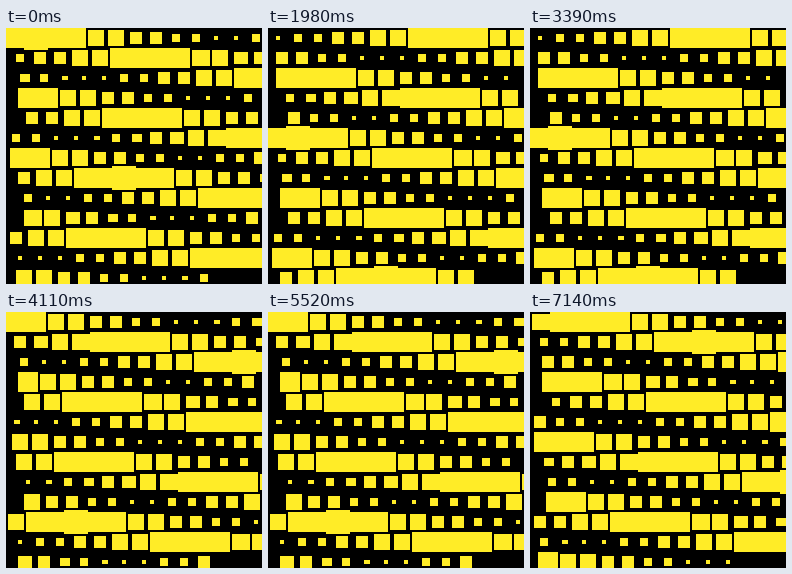
Recreate the animation shown at these times as an HTML page with a canvas. Size 256 by 256 pixels, loop 7.17 s.

```html
<!DOCTYPE html>
<html lang="en">
<head>
<meta charset="utf-8">
<title>Pulsing squares</title>
<style>
  html, body { margin: 0; width: 100%; height: 100%; overflow: hidden; background: #000; }
  canvas { display: block; width: 100vw; height: 100vh; image-rendering: pixelated; }
</style>
</head>
<body>
<canvas id="stage" width="256" height="256"></canvas>
<script>
const ctx = document.getElementById("stage").getContext("2d");
const SIDE = 256, CELL = 20, COUNT = 164;
const TICK = 30, TICKS = 239;
const WAVE = 94; // phase units in one triangle wave

// Distance from the nearest wave crest, 0 to WAVE / 2.
function crestDistance(i, tick) {
  const phase = (((5 * (i - 1) - 2 * tick) % WAVE) + WAVE) % WAVE;
  return Math.min(phase, WAVE - phase);
}

function draw(tick) {
  ctx.fillStyle = "#000";
  ctx.fillRect(0, 0, SIDE, SIDE);
  ctx.fillStyle = "#ffec27";
  for (let i = 0; i < COUNT; i++) {
    // Cells run on like text, keeping the remainder at each row end.
    const run = i * CELL;
    const cx = run % SIDE + CELL / 2;
    const cy = Math.floor(run / SIDE) * CELL + CELL / 2;
    const d = crestDistance(i, tick);
    const size = 24 - 4 * Math.ceil(d / 10);
    // A square that has just changed level is one coarse pixel wider.
    const extra = d % 10 === 1 ? 2 : 0;
    ctx.fillRect(cx - size / 2, cy - size / 2, size + extra, size);
  }
}

let shown = -1;
function loop() {
  const tick = Math.floor(performance.now() / TICK) % TICKS;
  if (tick !== shown) draw(shown = tick);
  requestAnimationFrame(loop);
}
loop();
</script>
</body>
</html>
```
